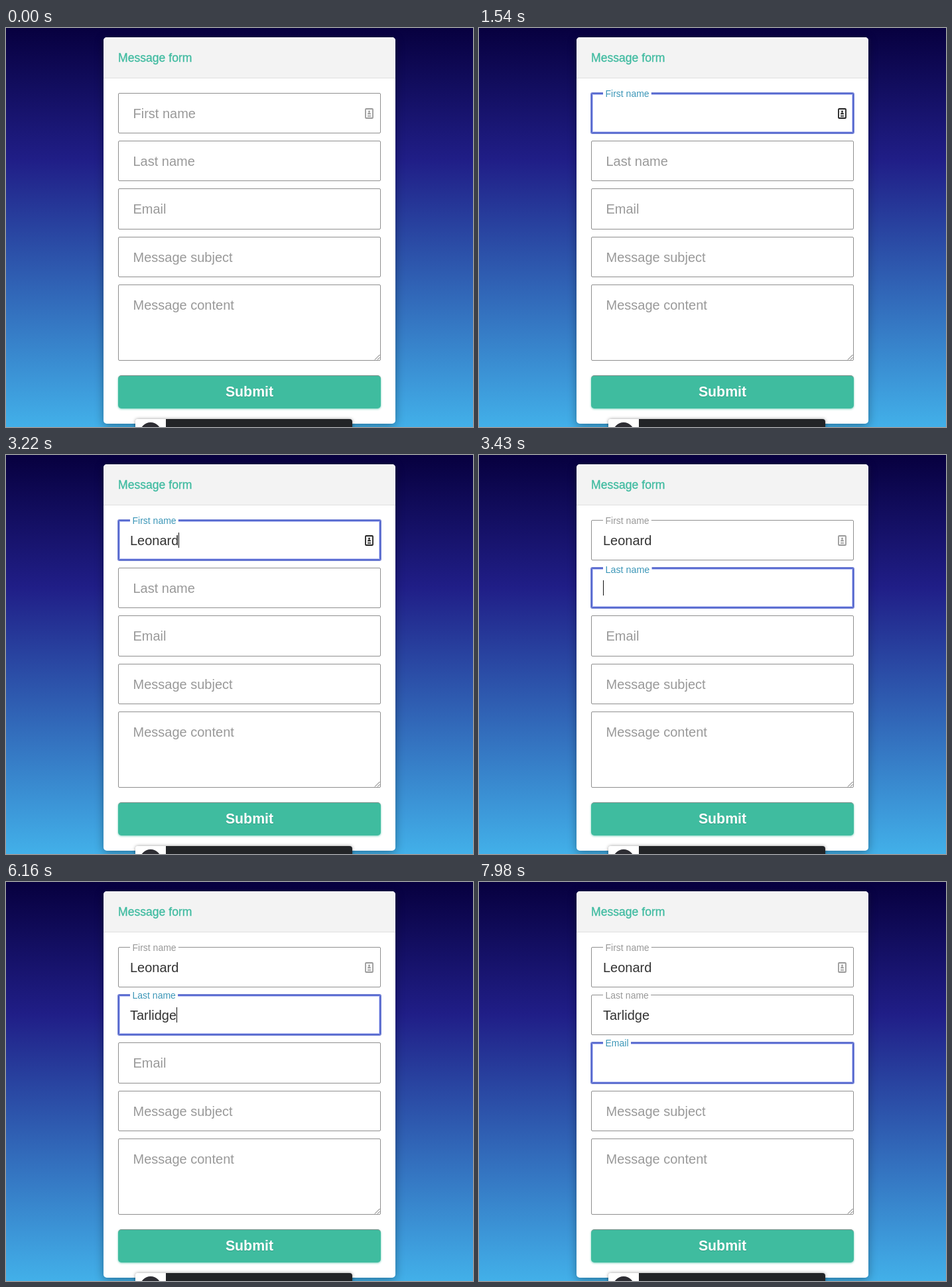
Recreate the animation shown at these times as an HTML page. Size 704 by 602 pixels, loop 8 s.

```html
<!DOCTYPE html>
<html lang="en">
<head>
<meta charset="utf-8">
<title>Message form</title>
<style>
  html, body { margin: 0; width: 100%; height: 100%; overflow: hidden; }
  body {
    position: relative;
    font: 20px/22px "Liberation Sans", Arial, sans-serif;
    background: linear-gradient(#07003f, #201e87 200px, #42b0e9 602px);
  }
  body * { position: absolute; box-sizing: border-box; white-space: pre; }
  .card {
    left: 147px; top: 14px; width: 440px; height: 583px;
    border-radius: 5px; background: #fff; overflow: hidden;
  }
  .shade {
    left: 147px; top: 14px; width: 440px; height: 583px; border-radius: 5px;
    box-shadow: 0 3px 14px rgba(0, 0, 0, .35);
  }
  .head {
    width: 440px; height: 62px; padding-left: 22px;
    background: #f3f3f3; border-bottom: 1px solid #e0e0e0;
    color: #3fbba0; font-size: 17.6px; line-height: 62px;
    -webkit-text-stroke: .3px #3fbba0;
  }
  .field {
    left: 169px; width: 396px;
    border: 1px solid #8f8f8f; border-radius: 2px; background: #fff;
  }
  .field.on {
    border-color: #5568c8;
    box-shadow: 0 0 0 1px #7d8ada, inset 0 0 0 1px #5a6cd8, inset 0 0 0 2px #c0c7f2;
  }
  .label {
    left: 186.5px; padding: 0 5px; background: #fff; color: #999;
    transform-origin: 0 50%;
  }
  .on + .label { color: #3d97b8; }
  .typed { left: 187px; height: 24px; line-height: 24px; color: #333; }
  .caret { left: 100%; top: 0; width: 1px; height: 23px; background: #111; }
  .submit {
    left: 169px; top: 524px; width: 396px; height: 50px;
    border-radius: 5px; border-top: 1px solid #7f8f8a;
    background: #3fbc9f; color: #fff; text-align: center;
    font-weight: bold; font-size: 21.3px; line-height: 49px;
    text-shadow: 0 1px 1px rgba(0, 0, 0, .15);
    box-shadow: 0 1px 3px rgba(63, 188, 159, .7);
  }
  .bar {
    left: 195px; top: 590px; width: 327px; height: 40px;
    border-radius: 4px; overflow: hidden;
    background: linear-gradient(90deg, #fff 46px, #222427 46px);
  }
  .barShade {
    left: 195px; top: 590px; width: 327px; height: 40px; border-radius: 4px;
    box-shadow: 0 0 5px rgba(0, 0, 0, .4);
  }
  .dot { left: 7px; top: 5px; width: 32px; height: 32px; border-radius: 50%; background: #2d2d33; }
</style>
</head>
<body>
<div class="shade"></div>
<div class="card"><div class="head">Message form</div></div>
<div id="form"></div>
<svg id="icon" style="left:541px;top:121px" width="13" height="16" fill="#222">
  <rect x="1" y="1" width="11" height="14" rx="1" fill="#fff" stroke="#222" stroke-width="1.8"/>
  <circle cx="6.5" cy="5" r="1.4"/>
  <path d="M4 9q0-2.6 2.5-2.6T9 9zM4 10.3h5v1H4zM4 12h5v1H4z"/>
</svg>
<svg style="left:555px;top:492px" width="9" height="9" stroke="#666" stroke-width="1">
  <path d="M1 8.5 8.5 1M5 8.5 8.5 5"/>
</svg>
<div class="submit">Submit</div>
<div class="barShade"></div>
<div class="bar"><div class="dot"></div></div>
<script>
const LOOP = 8000, MOVE = 200, BLINK = 500;

// Key times; "<" deletes the last letter.
const keys = [
  { text: "Leonard", times: [2660, 2740, 2820, 2900, 2980, 3060, 3140] },
  { text: "Taril<<lidge", times: [4200, 4340, 4480, 4620, 4760, 5110, 5180, 5390, 5530, 5600, 5740, 5810] },
  { text: "", times: [] }
];
const focusAt = [810, 3285, 7410];

const form = document.getElementById("form");
const icon = document.getElementById("icon");

function add(className, parent = form) {
  const el = document.createElement("div");
  el.className = className;
  return parent.appendChild(el);
}

const fields = [
  ["First name", 98, 61], ["Last name", 170, 61], ["Email", 242, 62],
  ["Message subject", 315, 61], ["Message content", 387, 115]
].map(([name, top, height]) => {
  const box = add("field"), label = add("label"), typed = add("typed");
  box.style.top = top + "px";
  box.style.height = height + "px";
  label.textContent = name;
  label.style.top = top + 19.5 + "px";
  typed.style.top = top + 19 + "px";
  const value = document.createTextNode("");
  typed.append(value);
  return { box, label, value, caret: add("caret", typed) };
});

// CSS "ease": cubic-bezier(.25, .1, .25, 1)
function ease(x) {
  if (x <= 0) return 0;
  if (x >= 1) return 1;
  const curve = (a, b, u) => 3 * a * u * (1 - u) ** 2 + 3 * b * u * u * (1 - u) + u ** 3;
  let lo = 0, hi = 1;
  for (let i = 0; i < 20; i++) {
    const mid = (lo + hi) / 2;
    if (curve(.25, .25, mid) < x) lo = mid; else hi = mid;
  }
  return curve(.1, 1, lo);
}

function typedText({ text, times }, t) {
  let out = "";
  times.forEach((time, i) => {
    if (time <= t) out = text[i] === "<" ? out.slice(0, -1) : out + text[i];
  });
  return out;
}

function draw(t) {
  const active = focusAt.filter(time => time <= t).length - 1;
  fields.forEach((f, i) => {
    const on = i === active;
    const p = i < focusAt.length ? ease((t - focusAt[i]) / MOVE) : 0;
    f.box.classList.toggle("on", on);
    f.label.style.transform = `translateY(${-29.5 * p}px) scale(${1 - .3 * p})`;
    f.value.data = keys[i] ? typedText(keys[i], t) : "";
    let lit = false;
    if (on) {
      const last = Math.max(focusAt[i], ...keys[i].times.filter(time => time <= t));
      lit = Math.floor((t - last) / BLINK) % 2 === 0;
    }
    f.caret.style.display = lit ? "block" : "none";
  });
  icon.style.opacity = active === 0 ? 1 : .45;
}

function tick() {
  draw(performance.now() % LOOP);
  requestAnimationFrame(tick);
}
tick();
</script>
</body>
</html>
```
